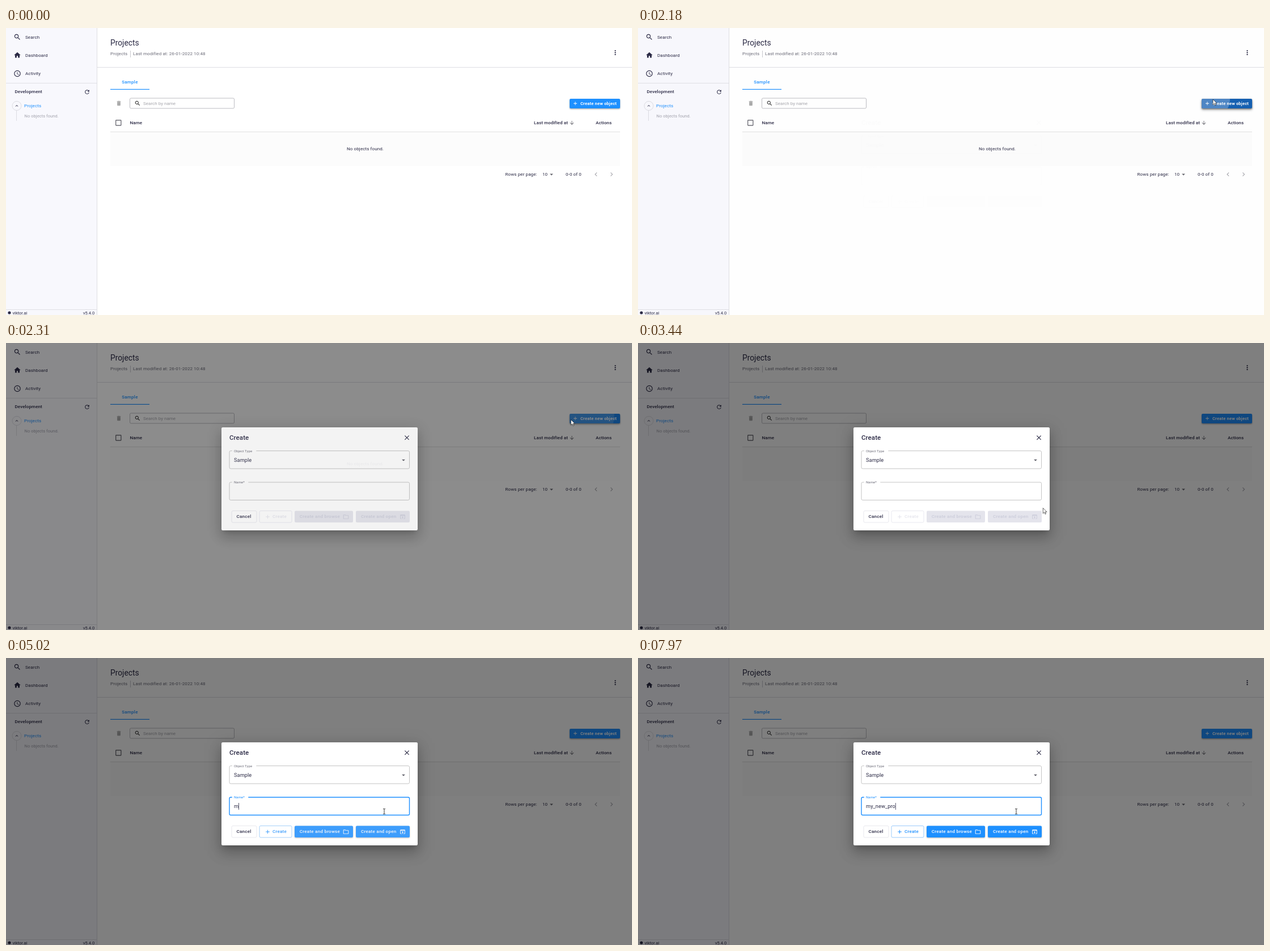
These frames come from a looping animation (1104 by 507 pixels, 8000 ms). An HTML page:

```html
<!DOCTYPE html>
<html lang="en">
<head>
<meta charset="utf-8">
<title>Projects</title>
<style>
html, body { margin: 0; width: 100%; height: 100%; overflow: hidden; background: #fff; }
svg { display: block; width: 1104px; height: 507px; font-family: Roboto, sans-serif; }
text { white-space: pre; }
</style>
</head>
<body>
<svg id="stage" viewBox="0 0 1104 507"></svg>
<script>
const INK = '#2b2a45', BLUE = '#1e90ff', SOFT = '#6b6b78';
const PATHS = {
  search: 'M15.5 14h-.79l-.28-.27C15.41 12.59 16 11.11 16 9.5 16 5.91 13.09 3 9.5 3S3 5.91 3 9.5 5.91 16 9.5 16c1.61 0 3.09-.59 4.23-1.57l.27.28v.79l5 4.99L20.49 19l-4.99-5zm-6 0C7.01 14 5 11.99 5 9.5S7.01 5 9.5 5 14 7.01 14 9.5 11.99 14 9.5 14z',
  home: 'M10 20v-6h4v6h5v-8h3L12 3 2 12h3v8z',
  clock: 'M12 2a10 10 0 1 0 0 20a10 10 0 1 0 0-20zm0 18a8 8 0 1 1 0-16a8 8 0 1 1 0 16zM12.5 7H11v6l5.25 3.15.75-1.23-4.5-2.67z',
  refresh: 'M17.65 6.35C16.2 4.9 14.21 4 12 4c-4.42 0-7.99 3.58-7.99 8s3.57 8 7.99 8c3.73 0 6.84-2.55 7.73-6h-2.08c-.82 2.33-3.04 4-5.65 4-3.31 0-6-2.69-6-6s2.69-6 6-6c1.66 0 3.14.69 4.22 1.78L13 11h7V4l-2.35 2.35z',
  bin: 'M6 19c0 1.1.9 2 2 2h8c1.1 0 2-.9 2-2V7H6v12zM19 4h-3.5l-1-1h-5l-1 1H5v2h14V4z',
  more: 'M10 6a2 2 0 1 0 4 0a2 2 0 1 0-4 0zm0 6a2 2 0 1 0 4 0a2 2 0 1 0-4 0zm0 6a2 2 0 1 0 4 0a2 2 0 1 0-4 0z',
  add: 'M19 13h-6v6h-2v-6H5v-2h6V5h2v6h6v2z',
  down: 'M20 12l-1.41-1.41L13 16.17V4h-2v12.17l-5.58-5.59L4 12l8 8 8-8z',
  left: 'M15.41 7.41L14 6l-6 6 6 6 1.41-1.41L10.83 12z',
  right: 'M10 6L8.59 7.41 13.17 12l-4.58 4.59L10 18l6-6z',
  up: 'M12 8l-6 6 1.41 1.41L12 10.83l4.59 4.58L18 14z',
  drop: 'M7 10l5 5 5-5z',
  close: 'M19 6.41L17.59 5 12 10.59 6.41 5 5 6.41 10.59 12 5 17.59 6.41 19 12 13.41 17.59 19 19 17.59 13.41 12z',
  folder: 'M9.17 6l2 2H20v10H4V6h5.17M10 4H4c-1.1 0-1.99.9-1.99 2L2 18c0 1.1.9 2 2 2h16c1.1 0 2-.9 2-2V8c0-1.1-.9-2-2-2h-8l-2-2z',
  open: 'M19 4H5c-1.11 0-2 .9-2 2v12c0 1.1.89 2 2 2h4v-2H5V8h14v10h-4v2h4c1.1 0 2-.9 2-2V6c0-1.1-.89-2-2-2zm-7 6l-4 4h3v6h2v-6h3l-4-4z',
  box: 'M19 5v14H5V5h14m0-2H5c-1.1 0-2 .9-2 2v14c0 1.1.9 2 2 2h14c1.1 0 2-.9 2-2V5c0-1.1-.9-2-2-2z'
};

// Markup helpers
const text = (s, x, y, { size = 8.05, fill = INK, weight = 400, gap = 0.0107, extra = '' } = {}) =>
  `<text x="${x}" y="${y}" font-size="${size}" font-weight="${weight}" fill="${fill}" letter-spacing="${gap * size}" ${extra}>${s}</text>`;
const rect = (x, y, w, h, attrs) => `<rect x="${x}" y="${y}" width="${w}" height="${h}" ${attrs}/>`;
const line = (x1, y1, x2, y2, color) => `<path d="M${x1} ${y1}L${x2} ${y2}" stroke="${color}"/>`;
const icon = (name, cx, cy, size, fill = INK, attrs = '') =>
  `<path d="${PATHS[name]}" fill="${fill}" ${attrs} transform="translate(${cx - size / 2} ${cy - size / 2}) scale(${size / 24})"/>`;
const shade = (x, y, w, h, dy, blur, grow, alpha, id = '') =>
  rect(x - grow, y - grow + dy, w + 2 * grow, h + 2 * grow, `${id} rx="2" fill="#000" fill-opacity="${alpha}" style="filter:blur(${blur}px)"`);
const label = (s, x, y, id = '') =>
  text(s, x, y, { size: 6.04, fill: SOFT, gap: 0.0094, extra: id });

const sidebar =
  rect(0, 0, 160, 507, 'fill="#f8f8fd"') + line(160.5, 0, 160.5, 507, '#dedee3') +
  icon('search', 20, 16, 13.8) + text('Search', 34, 18.5) +
  icon('home', 20, 48, 13.8) + text('Dashboard', 34, 50.8) +
  icon('clock', 20, 80.5, 13.8) + text('Activity', 34, 83) +
  line(0, 97.5, 160, 97.5, '#e0e0e5') +
  text('Development', 15.5, 115.3, { weight: 500 }) + icon('refresh', 143, 113, 11.5) +
  line(18.5, 145, 18.5, 164, '#dcdce2') +
  '<circle cx="19" cy="137.5" r="8" fill="#f8f8fd" stroke="#dcdce2"/>' +
  icon('up', 19, 137.5, 9.5) + text('Projects', 32, 140, { fill: BLUE }) +
  text('No objects found.', 32.5, 158, { size: 7.475, fill: '#a2a2ac' }) +
  line(0, 497.5, 160, 497.5, '#e0e0e5') +
  `<circle cx="6" cy="503" r="2.6" fill="${INK}"/>` +
  text('viktor.ai', 11.5, 506, { size: 7.475, gap: 0, extra: 'text-decoration="underline"' }) +
  text('v5.4.0', 136, 506, { size: 7.475, gap: 0 });

const page =
  text('Projects', 184, 31.3, { size: 13.8, gap: 0 }) +
  text('Projects', 184, 48.4, { fill: SOFT }) + line(219.5, 40, 219.5, 52, '#c8c8ce') +
  text('Last modified at: 26-01-2022 10:48', 224, 48.4, { fill: SOFT }) +
  icon('more', 1074.5, 43.5, 13.8) + line(161, 69.5, 1104, 69.5, '#dedee3') +
  text('Sample', 204.2, 97.5, { weight: 500, fill: BLUE, gap: 0.0286 }) +
  rect(184, 107.8, 69, 1.2, `fill="${BLUE}"`) +
  icon('bin', 199, 133, 11.5, '#ababab') +
  rect(218.5, 124, 184, 18, 'rx="2" fill="#fff" stroke="#bdbdc2"') +
  icon('search', 232, 133, 11.5, '#222') +
  text('Search by name', 242, 136, { fill: '#a6a6ac', gap: 0 }) +
  icon('box', 198.3, 167.5, 13.8, '#55555f') +
  text('Name', 218.5, 170, { weight: 500 }) +
  text('Last modified at', 931, 170, { weight: 500 }) + icon('down', 998, 167.5, 10.35, '#66666e') +
  text('Actions', 1040, 170, { weight: 500 }) +
  rect(184, 184, 899, 60, 'fill="#fcfcfc"') + line(184, 183.5, 1083, 183.5, '#e0e0e0') +
  text('No objects found.', 601, 216) +
  text('Rows per page:', 880.5, 261) + text('10', 946, 261) +
  icon('drop', 962, 258.7, 13.8, '#66666e') + text('0-0 of 0', 987, 261) +
  icon('left', 1040.5, 258.5, 13.8, '#a8a8ae') + icon('right', 1068, 258.5, 13.8, '#a8a8ae');

const createButton =
  shade(994, 125, 89, 17, 1.2, 1, 0, 0.35) + shade(994, 125, 89, 17, 2.5, 2.2, 0, 0.35, 'id="lift"') +
  rect(994, 125, 89, 17, 'id="newFill" rx="2"') +
  '<clipPath id="newClip">' + rect(994, 125, 89, 17, 'rx="2"') + '</clipPath>' +
  '<g clip-path="url(#newClip)"><circle id="ripple" cx="1014" cy="127" fill="#fff"/></g>' +
  icon('add', 1004, 133.2, 10.35, '#fff') +
  text('Create new object', 1013, 136, { size: 7.475, weight: 700, fill: '#fff', gap: 0.0286 });

const action = (s, x, w, tx, sign, ix, id) =>
  `<g id="${id}">` + rect(x, 296.5, w, 20.5, 'rx="2"') +
  icon(sign, ix, 307, 11.5, 'currentColor') +
  text(s, tx, 309, { weight: 500, fill: 'currentColor', gap: 0.0286 }) + '</g>';

const dialog =
  shade(380, 149, 346, 182, 6.3, 4.3, -4, 0.2) + shade(380, 149, 346, 182, 13.8, 11, 1.7, 0.14) +
  shade(380, 149, 346, 182, 5.2, 13, 4.6, 0.12) +
  rect(380, 149, 346, 182, 'rx="2.3" fill="#fff"') +
  text('Create', 394, 171, { size: 11.5, weight: 500, gap: 0.0075 }) + icon('close', 707, 167.2, 13.8) +
  rect(394, 190.5, 317.5, 31.5, 'rx="2.3" fill="none" stroke="#c4c4c4"') +
  rect(398.8, 189, 42.5, 3, 'fill="#fff"') + label('Object Type', 402, 193) +
  text('Sample', 402, 209.8, { size: 9.2, gap: 0.0094 }) + icon('drop', 701, 206.8, 13.8, '#55555f') +
  rect(394, 246, 317.5, 31.5, 'id="field" rx="2.3" fill="none"') +
  rect(398.8, 244.5, 28.5, 3, 'fill="#fff"') + label('Name*', 402, 248.3, 'id="nameLabel"') +
  text('', 402, 265.2, { size: 9.2, gap: 0.0094, extra: 'id="typed"' }) +
  rect(0, 256, 0.8, 12, `id="caret" fill="${INK}"`) +
  rect(398, 296.5, 44, 20.5, 'rx="2" fill="none" stroke="#e2e2ea" stroke-width=".8"') +
  text('Cancel', 406.5, 309, { weight: 500, gap: 0.0286 }) +
  action('Create', 447, 57, 470, 'add', 461.5, 'plain') +
  action('Create and browse', 509, 103, 517.8, 'folder', 599.5, 'browse') +
  action('Create and open', 617, 95, 626, 'open', 699.5, 'launch');

const pointers =
  '<path id="arrow" d="M0 0V9.6L2.3 7.5 3.8 10.9 5.3 10.2 3.8 6.9H6.8Z" fill="#fff" stroke="#000" stroke-width=".6"/>' +
  '<path id="beam" d="M-2 -4.6H-.6L0 -4 .6 -4.6H2M0 -4V4M-2 4.6H-.6L0 4 .6 4.6H2" fill="none" stroke="#222" stroke-width=".9"/>';

document.getElementById('stage').innerHTML =
  sidebar + page + createButton + rect(0, 0, 1104, 507, 'id="shadeAll"') +
  `<g id="dialog">${dialog}</g>` + pointers;

const el = {};
document.querySelectorAll('#stage [id]').forEach(n => { el[n.id] = n; });
const set = (id, attrs) => { for (const k in attrs) el[id].setAttribute(k, attrs[k]); };

// Standard ease curve: cubic-bezier(.4, 0, .2, 1)
function ease(t, from, length) {
  const p = Math.min(1, Math.max(0, (t - from) / length));
  let lo = 0, hi = 1;
  for (let i = 0; i < 20; i++) {
    const m = (lo + hi) / 2, n = 1 - m;
    if (3 * n * n * m * 0.4 + 3 * n * m * m * 0.2 + m * m * m < p) lo = m; else hi = m;
  }
  return p === 1 ? 1 : lo * lo * (3 - 2 * lo);
}
const mix = (a, b, p) => `rgb(${a.map((v, i) => Math.round(v + (b[i] - v) * p)).join()})`;
const RGB = { blue: [30, 144, 255], deep: [21, 96, 178], white: [255, 255, 255], pale: [228, 228, 236], faint: [203, 204, 218], soft: [107, 107, 120] };

// time, x, y of the pointer
const ROUTE = [
  [450, 557, 488], [520, 690, 405], [590, 860, 295], [660, 990, 215], [730, 1041, 186],
  [1000, 1041, 186], [1300, 1030, 152], [1770, 1015, 127], [2180, 1014, 126], [2260, 1011, 128],
  [2310, 997, 135], [2390, 940, 165], [2500, 820, 236], [2600, 748, 280], [2700, 721, 296],
  [3370, 721, 296], [3560, 703, 284], [3720, 680, 274], [3850, 667, 271], [8000, 667, 271]
];
function pointerAt(t) {
  const i = Math.max(1, ROUTE.findIndex(k => k[0] > t));
  const [t0, x0, y0] = ROUTE[i - 1], [t1, x1, y1] = ROUTE[i];
  const p = (t - t0) / (t1 - t0);
  return [x0 + (x1 - x0) * p, y0 + (y1 - y0) * p];
}

const NAME = 'my_new_pro';
const KEYS = [4880, 5230, 5560, 6100, 6290, 6490, 6970, 7570, 7770, 7970];
const FOCUS = 3950, BLINK = 530;

function draw(t) {
  const fade = ease(t, 2168, 225);
  set('shadeAll', { 'fill-opacity': 0.5 * fade });
  set('dialog', { opacity: fade });

  const hover = ease(t, 1400, 250) - ease(t, 2200, 250);
  set('newFill', { fill: mix(RGB.blue, RGB.deep, hover) });
  set('lift', { opacity: hover });
  set('ripple', { r: 70 * ease(t, 2004, 550), opacity: 0.25 * (1 - ease(t, 2150, 550)) });

  const focused = t >= FOCUS;
  set('field', { stroke: focused ? BLUE : '#c4c4c4', 'stroke-width': focused ? 1.4 : 1 });
  set('nameLabel', { fill: mix(RGB.soft, RGB.blue, ease(t, FOCUS, 200)) });

  const count = KEYS.filter(k => t >= k).length;
  el.typed.textContent = NAME.slice(0, count);
  const since = t - (count ? KEYS[count - 1] : FOCUS);
  const lit = focused && Math.floor(since / BLINK) % 2 === 0;
  set('caret', { x: 402 + (count ? el.typed.getComputedTextLength() : 0), opacity: lit ? 1 : 0 });

  const on = ease(t, KEYS[0], 250);
  el.plain.style.color = mix(RGB.pale, RGB.blue, on);
  el.plain.firstChild.style.cssText = `fill:none;stroke-width:.8;stroke:${mix(RGB.pale, [130, 190, 250], on)}`;
  for (const id of ['browse', 'launch']) {
    el[id].style.color = mix(RGB.faint, RGB.white, on);
    el[id].firstChild.style.cssText = `fill:${mix(RGB.pale, RGB.blue, on)};filter:drop-shadow(0 1px 1px rgba(0,0,0,${0.3 * on}))`;
  }

  const [x, y] = pointerAt(t);
  const inField = t > 3370 && x < 712 && y < 277;
  const place = `translate(${x} ${y})`;
  set('arrow', { transform: place, opacity: t >= 450 && !inField ? 1 : 0 });
  set('beam', { transform: place, opacity: inField ? 1 : 0 });
}

function tick() {
  draw(performance.now() % 8000);
  requestAnimationFrame(tick);
}
tick();
</script>
</body>
</html>
```
